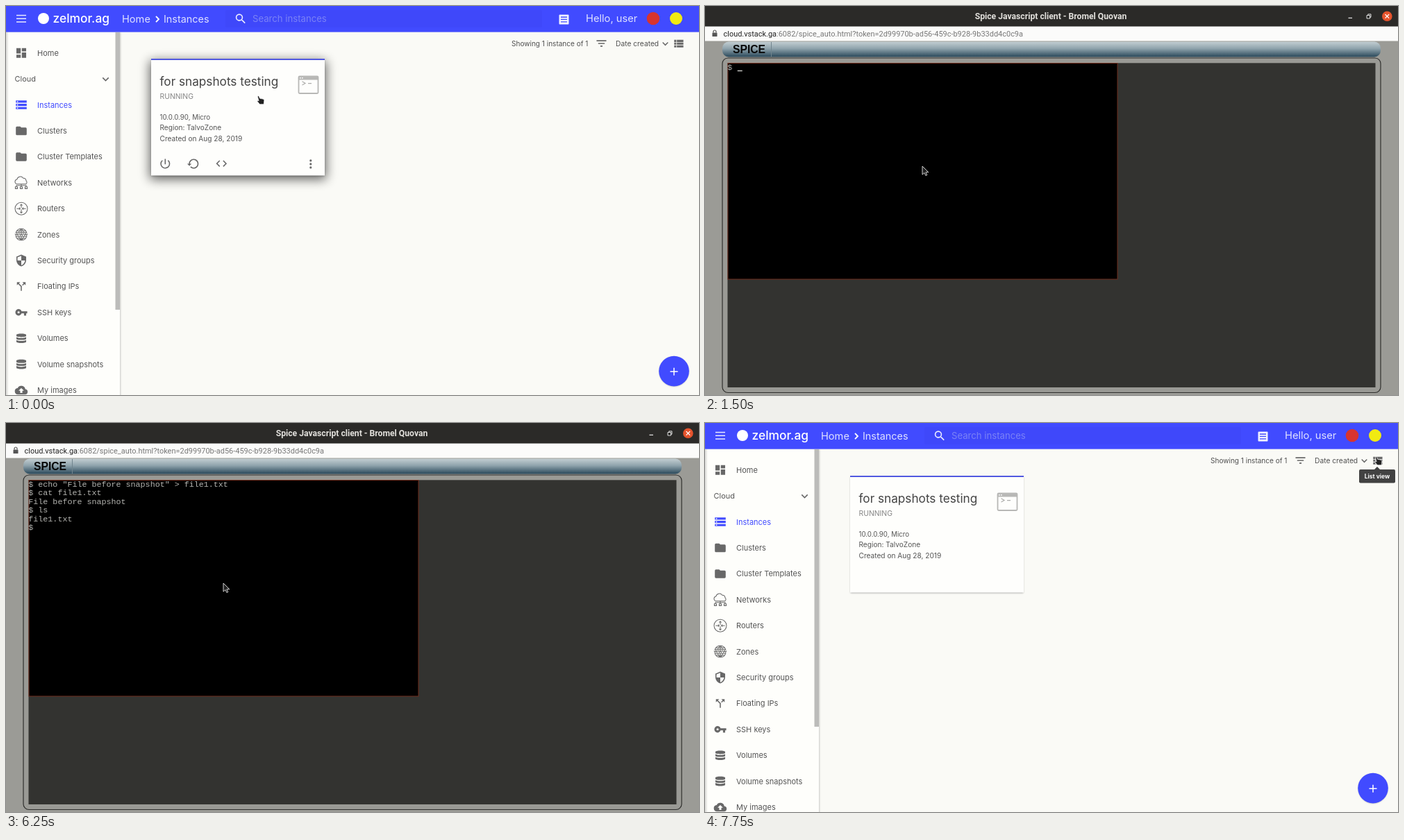
An HTML page for the animation above (8 s loop, 998 by 561 pixels).

```html
<!DOCTYPE html>
<html lang="en">
<head>
<meta charset="utf-8">
<title>Instance console</title>
<style>
html, body { margin: 0; width: 100%; height: 100%; overflow: hidden; background: #fafaf6; }
svg { display: block; width: 998px; height: 561px; }
text { font-family: Inter, sans-serif; white-space: pre; }
.mono { font-family: "Liberation Mono", monospace; font-size: 11.7px; fill: #b4b4b0; }
.bar { font-family: Roboto, sans-serif; }
.arial { font-family: "Liberation Sans", Arial, sans-serif; }
</style>
</head>
<body>
<svg id="stage" viewBox="0 0 998 561" xmlns="http://www.w3.org/2000/svg">
  <defs>
    <linearGradient id="steel" x1="0" y1="0" x2="0" y2="1">
      <stop offset="0" stop-color="#c3ced2"/>
      <stop offset=".45" stop-color="#8fa3ac"/>
      <stop offset="1" stop-color="#29485a"/>
    </linearGradient>
    <linearGradient id="edge">
      <stop offset="0" stop-color="#000" stop-opacity=".16"/>
      <stop offset="1" stop-color="#000" stop-opacity="0"/>
    </linearGradient>
    <filter id="blur" x="-20%" y="-30%" width="140%" height="160%"><feGaussianBlur stdDeviation="8"/></filter>
    <filter id="soft" x="-20%" y="-20%" width="140%" height="150%"><feGaussianBlur stdDeviation="1.3"/></filter>
    <clipPath id="screen"><rect x="33" y="82" width="561" height="312"/></clipPath>
  </defs>
  <g id="panel"></g>
  <g id="client"></g>
  <g id="pointer">
    <path id="arrow" d="M0 0V12.2L2.9 9.6 4.9 13.6 6.8 12.7 4.9 8.8H8.8Z" stroke-width=".9" stroke-linejoin="round"/>
    <path id="hand" d="M-.6.9C-.9-.4.9-.9 1.4.4L2.6 3.2 7 4.1C8.6 4.5 9 5.4 8.8 7L8.2 11.8H2.4L-.9 7.7C-1.5 6.8-.3 6 .6 6.6L1.1 7Z" fill="#222" stroke="#fff" stroke-width=".7"/>
  </g>
</svg>
<script>
const BLUE = '#414bff', GREY = '#686868', INK = '#555';
const $ = id => document.getElementById(id);

const rect = (x, y, w, h, fill, extra = '') =>
  `<rect x="${x}" y="${y}" width="${w}" height="${h}" fill="${fill}" ${extra}/>`;
const label = (x, y, size, fill, str, extra = '') =>
  `<text x="${x}" y="${y}" font-size="${size}" fill="${fill}" ${extra}>${str}</text>`;
const line = (d, color, width = 1, extra = '') =>
  `<path d="${d}" fill="none" stroke="${color}" stroke-width="${width}" ${extra}/>`;
const dot = (x, y, r, fill) => `<circle cx="${x}" cy="${y}" r="${r}" fill="${fill}"/>`;

// Filled icons on a 24-unit grid
const shapes = {
  grid: 'M3 13h8V3H3zm0 8h8v-6H3zm10 0h8V11h-8zm0-18v6h8V3z',
  rows: 'M2 20h20v-4H2zm2-3h2v2H4zM2 4v4h20V4zm4 3H4V5h2zm-4 7h20v-4H2zm2-3h2v2H4z',
  folder: 'M10 4H4a2 2 0 0 0-2 2v12a2 2 0 0 0 2 2h16a2 2 0 0 0 2-2V8a2 2 0 0 0-2-2h-8z',
  shield: 'M12 1L3 5v6c0 5.55 3.84 10.74 9 12 5.16-1.26 9-6.45 9-12V5zm0 11h7c-.53 4.12-3.28 7.79-7 8.94V12H5V6.3l7-3.11z',
  split: 'M14 4l2.29 2.29-2.88 2.88 1.42 1.42 2.88-2.88L20 10V4zM10 4H4v6l2.29-2.29 4.71 4.7V20h2v-8.41l-5.29-5.3z',
  key: 'M12.65 10A6 6 0 1 0 12.65 14H17v4h4v-4h2v-4zM7 14a2 2 0 1 1 0-4 2 2 0 0 1 0 4z',
  upload: 'M19.35 10.04A7.5 7.5 0 0 0 5.35 8.04 6 6 0 0 0 6 20h13a5 5 0 0 0 .35-9.96zM14 13v4h-4v-4H7l5-5 5 5z',
  search: 'M15.5 14h-.79l-.28-.27A6.5 6.5 0 1 0 13.73 14.43l.27.28v.79l5 4.99L20.49 19zm-6 0a4.5 4.5 0 1 1 0-9 4.5 4.5 0 0 1 0 9z',
  power: 'M13 3h-2v10h2zm4.83 2.17l-1.42 1.42A6.92 6.92 0 0 1 19 12a7 7 0 1 1-11.42-5.42L6.17 5.17A8.93 8.93 0 0 0 3 12a9 9 0 0 0 18 0c0-2.74-1.23-5.18-3.17-6.83z',
  restart: 'M13 3a9 9 0 0 0-9 9H1l3.89 3.89.07.14L9 12H6a7 7 0 1 1 2.05 4.94l-1.42 1.42A9 9 0 1 0 13 3z',
  code: 'M9.4 16.6L4.8 12l4.6-4.6L8 6l-6 6 6 6zm5.2 0l4.6-4.6-4.6-4.6L16 6l6 6-6 6z',
  filter: 'M10 18h4v-2h-4zM3 6v2h18V6zm3 7h12v-2H6z',
  down: 'M7.41 8.59L12 13.17l4.59-4.58L18 10l-6 6-6-6z',
  list: 'M4 14h4v-4H4zm0 5h4v-4H4zM4 9h4V5H4zm5 5h12v-4H9zm0 5h12v-4H9zM9 5v4h12V5z',
  disks: 'M3 5.5C3 2.5 21 2.5 21 5.5V7.6C21 10.4 3 10.4 3 7.6zM3 9.8C6 12 18 12 21 9.8V13C21 15.8 3 15.8 3 13zM3 15.2C6 17.4 18 17.4 21 15.2V18.5C21 21.6 3 21.6 3 18.5z'
};
// Outline icons on the same grid
const outlines = {
  net: 'M3.5 14.5A4.4 4.4 0 0 1 4 6 6.4 6.4 0 0 1 15.5 3.6 5.4 5.4 0 0 1 21 8.6 3.6 3.6 0 0 1 20.5 14.5ZM12 14.5V19M3 19V17H21V19M1 19.5h4v3.5h-4zM10 19.5h4v3.5h-4zM19 19.5h4v3.5h-4z',
  router: 'M12 .5A11.5 11.5 0 1 0 12 23.5 11.5 11.5 0 1 0 12 .5ZM12 10.5V4.5M10 6 12 4 14 6M12 13.5v6M10 18 12 20 14 18M3.5 12H10M8 10 10 12 8 14M20.5 12H14M16 10 14 12 16 14',
  globe: 'M2 8.5A10.6 10.6 0 0 1 22 8.5ZM2 15.5A10.6 10.6 0 0 0 22 15.5ZM12 1.5V8.5M12 15.5V22.5M7.3 8.5Q8.5 3.5 12 1.5 15.5 3.5 16.7 8.5M7.3 15.5Q8.5 20.5 12 22.5 15.5 20.5 16.7 15.5M4 5H20M4 19H20M.5 10.5 2.2 13.5 4 10.5 5.8 13.5 7.5 10.5M8.5 10.5 10.2 13.5 12 10.5 13.8 13.5 15.5 10.5M16.5 10.5 18.2 13.5 20 10.5 21.8 13.5 23.5 10.5'
};
function icon(name, x, y, color = GREY, scale = 0.78) {
  const place = `transform="translate(${x} ${y}) scale(${scale}) translate(-12 -12)"`;
  return shapes[name]
    ? `<path d="${shapes[name]}" fill="${color}" fill-rule="evenodd" ${place}/>`
    : line(outlines[name], color, 1.3, place);
}

function tooltip(id, cx, top, w, str) {
  return `<g id="${id}">` + rect(cx - w / 2, top, w, 19.5, '#424242', 'rx="2"') +
    `<path d="M${cx - 4} ${top}l4-4 4 4z" fill="#424242"/>` +
    label(cx, top + 12.6, 8.5, '#fff', str, 'text-anchor="middle" font-weight="700"') + '</g>';
}

function header() {
  return rect(0, 0, 998, 37.6, BLUE) + rect(316, 6, 456, 25, '#3f48fa', 'rx="2"') +
    line('M15 13.5H29M15 18.3H29M15 23.1H29', '#e9eaff', 1.5) +
    dot(54, 18, 8, '#fff') +
    label(67.5, 23.5, 17.4, '#fff', 'zelmor.ag', 'font-weight="500"') +
    label(167, 23.6, 14.6, '#dfe1ff', 'Home') +
    line('M216 14.8 220 19 216 23.2', '#fff', 1.9) +
    label(227, 23.6, 14.4, '#dfe1ff', 'Instances') +
    icon('search', 338, 18.5, '#e9eaff', 0.8) +
    label(355, 22.7, 13.15, '#7b82f6', 'Search instances') +
    rect(796.5, 12.5, 14, 14, '#f0f1ff', 'rx="1"') +
    line('M799 16H808M799 19.4H808M799 22.8H808', BLUE, 1.3) +
    label(835, 23.4, 14.7, '#dfe1ff', 'Hello, user') +
    dot(932, 18, 9.3, '#d8342f') + dot(965, 18, 9, '#f1ea12');
}

function sidebar() {
  const items = [['grid', 'Home'], null, ['rows', 'Instances'], ['folder', 'Clusters'],
    ['folder', 'Cluster Templates'], ['net', 'Networks'], ['router', 'Routers'], ['globe', 'Zones'],
    ['shield', 'Security groups'], ['split', 'Floating IPs'], ['key', 'SSH keys'],
    ['disks', 'Volumes'], ['disks', 'Volume snapshots'], ['upload', 'My images']];
  let out = rect(0, 38, 165, 530, '#000', 'opacity=".2" filter="url(#soft)"') +
    rect(0, 38, 164, 523, '#fefefb') + rect(0, 38, 4, 523, 'url(#edge)') +
    rect(157.5, 38, 6.5, 400, '#bcbcba');
  items.forEach((item, i) => {
    const y = 67.8 + i * 37.4;
    if (!item) {
      out += label(12.5, y + 4, 10.95, INK, 'Cloud') + icon('down', 143.5, y + 0.4, GREY, 0.8);
      return;
    }
    const on = item[1] === 'Instances';
    out += icon(item[0], 22, y, on ? BLUE : GREY) + label(45, y + 4, 11, on ? BLUE : INK, item[1]);
  });
  return out;
}

function card() {
  return `<g id="lift">` + rect(207, 79, 254, 171, '#000', 'opacity=".6" filter="url(#blur)"') + '</g>' +
    rect(209.5, 78, 249, 167.3, '#000', 'opacity=".32" filter="url(#soft)"') +
    rect(209, 76, 250, 168.5, '#fefefc') + rect(209, 76, 250, 2, '#5058e0') +
    label(221.5, 115, 17.2, '#444', 'for snapshots testing') +
    label(221.5, 134, 10.4, '#868686', 'RUNNING') +
    label(221.5, 163.6, 9.7, INK, '10.0.0.90, Micro') +
    label(221.5, 179.2, 10.15, INK, 'Region: TalvoZone') +
    label(221.5, 194.8, 10.15, INK, 'Created on Aug 28, 2019') +
    rect(421.5, 101.5, 28, 24.5, 'none', 'rx="1.5" stroke="#b8b8b6" stroke-width="1.8"') +
    rect(421, 101, 29, 5.5, '#b8b8b6') + rect(423, 103, 1.6, 1.6, '#fff') + rect(426, 103, 1.6, 1.6, '#fff') +
    line('M426.5 108.8 431 111.4 426.5 114M435 111.6H440', '#adadab', 1.2) +
    '<g id="tools">' + icon('power', 229.3, 227.5) + icon('restart', 269.5, 227.5) +
    icon('code', 310.3, 227.2) + [222.9, 227.9, 232.9].map(y => dot(438.8, y, 1.6, GREY)).join('') + '</g>';
}

$('panel').innerHTML = rect(0, 0, 998, 561, '#fafaf6') + sidebar() + header() +
  label(728, 58, 10.05, '#505050', 'Showing 1 instance of 1') + icon('filter', 857.5, 54, GREY, 0.78) +
  label(878, 58, 10.25, '#505050', 'Date created') + icon('down', 949.5, 54.5, GREY, 0.72) +
  icon('list', 968.5, 54.3, GREY, 0.78) + card() +
  rect(941, 506, 42, 42.5, '#000', 'rx="21" opacity=".3" filter="url(#soft)"') +
  dot(962, 526.6, 21.8, BLUE) + line('M956.5 527.3H967.5M962 521.8V532.8', '#fff', 1.5) +
  tooltip('tipConsole', 310.2, 246.5, 51, 'Console') + tooltip('tipList', 968, 67, 52, 'List view');

const ROW = 12.42, COL = 7.02, LEFT = 32.3, BASE = 92;
$('client').innerHTML = rect(0, 0, 998, 561, '#9b9b96') + rect(0, 0, 998, 30, '#2b2a28') +
  label(498, 19, 12.2, '#e2e0dc', 'Spice Javascript client - Bromel Quovan',
    'class="bar" font-weight="700" text-anchor="middle"') +
  line('M926.5 17.3H932', '#ddd', 1.3) +
  line('M953 13.5H957.5V18H953ZM954.8 13V11.8H959V16.2H958', '#ddd', 1) +
  dot(982.3, 14.8, 7.3, '#e5532d') + line('M979.5 12 985.1 17.6M985.1 12 979.5 17.6', '#fff', 1.3) +
  rect(0, 29.5, 998, 21, '#fbfbfa') +
  rect(10.5, 38.5, 7, 5.5, '#555', 'rx=".6"') + line('M12 38.5V37A2 2 0 0 1 16 37V38.5', '#555', 1.2) +
  label(26.5, 43.8, 10.96, '#777', '<tspan fill="#222">cloud.vstack.ga</tspan>:6082/spice_auto.html?token=2d99970b-ad56-459c-b928-9b33dd4c0c9a', 'class="bar"') +
  rect(25, 51.5, 948, 22, 'url(#steel)', 'rx="9"') + line('M95.5 52V73', '#71858e', 1) +
  label(40, 68, 15.7, '#080808', 'SPICE', 'class="arial" font-weight="700"') +
  rect(25, 75, 948, 482.5, '#9a9a95', 'rx="8" stroke="#30302e" stroke-width="1.2"') +
  rect(32.5, 82.3, 933, 467.7, '#333330') +
  rect(33, 82.5, 561, 311.5, '#000', 'stroke="#702c1c" stroke-width="1"') +
  '<g clip-path="url(#screen)">' +
  [0, 1, 2, 3, 4, 5].map(i => `<text class="mono" id="row${i}" x="${LEFT}" y="${BASE + i * ROW}"></text>`).join('') +
  rect(0, 0, 7, 1.5, '#c4c4c0', 'id="caret"') + '</g>';

const clamp = v => Math.max(0, Math.min(1, v));
const ramp = (t, a, b) => clamp((t - a) / (b - a));
const ease = u => u * u * (3 - 2 * u);
const mix = (a, b, u) => a + (b - a) * u;
const show = (id, alpha) => {
  $(id).style.display = alpha > 0 ? '' : 'none';
  $(id).style.opacity = alpha;
};

const ECHO = 'echo "File before snapshot" > file1.txt', CAT = 'cat file1.txt';

function session(t) {
  const typed = Math.round(16 * ramp(t, 1500, 1750) + 23 * ramp(t, 1750, 2250));
  const rows = ['$ ' + ECHO.slice(0, typed)];
  if (t >= 2500) rows.push('$ ' + CAT.slice(0, Math.round(13 * ramp(t, 2500, 3125))));
  if (t >= 3250) rows.push('File before snapshot', '$ ' + 'ls'.slice(0, Math.floor(2 * ramp(t, 3375, 3625))));
  if (t >= 3875) rows.push('file1.txt', '$ ');
  return rows;
}

function drawClient(t) {
  const rows = session(t), last = rows.length - 1;
  for (let i = 0; i < 6; i++) $('row' + i).textContent = rows[i] || '';
  const off = (t >= 4000 && t < 4375) || (t >= 5625 && t < 6000) || t >= 6250;
  show('caret', off ? 0 : 1);
  $('caret').setAttribute('x', LEFT + 0.4 + rows[last].length * COL);
  $('caret').setAttribute('y', BASE + 0.7 + last * ROW);
}

function pointerAt(t) {
  if (t < 6375) {
    const u = ease(ramp(t, 0, 1000));
    return [mix(363, 313, u), mix(130, 231, u)];
  }
  const u = ease(ramp(t, 6375, 7375));
  return [mix(332, 966, u), mix(171, 49, u)];
}

function draw(ms) {
  // The picture advances in eighths of a second
  const t = Math.floor((ms % 8000) / 125) * 125;
  const remote = t >= 1500 && t < 6375;
  show('client', remote ? 1 : 0);
  if (remote) drawClient(t);

  const [x, y] = pointerAt(t);
  const hand = !remote && (t < 6375 ? y < 218 : x < 459 || x > 955);
  $('pointer').setAttribute('transform', `translate(${x} ${y})`);
  show('hand', hand ? 1 : 0);
  show('arrow', hand ? 0 : 1);
  $('arrow').setAttribute('fill', remote ? '#222' : '#1c1c1c');
  $('arrow').setAttribute('stroke', remote ? '#e6e6e6' : '#fff');

  const hover = 1 - ramp(t, 6625, 6875);
  show('lift', hover);
  show('tools', hover);
  show('tipConsole', t < 1500 ? ramp(t, 875, 1250) : 0);
  show('tipList', ramp(t, 7250, 7625));
}

function tick(now) {
  draw(now);
  requestAnimationFrame(tick);
}
draw(0);
requestAnimationFrame(tick);
</script>
</body>
</html>
```
